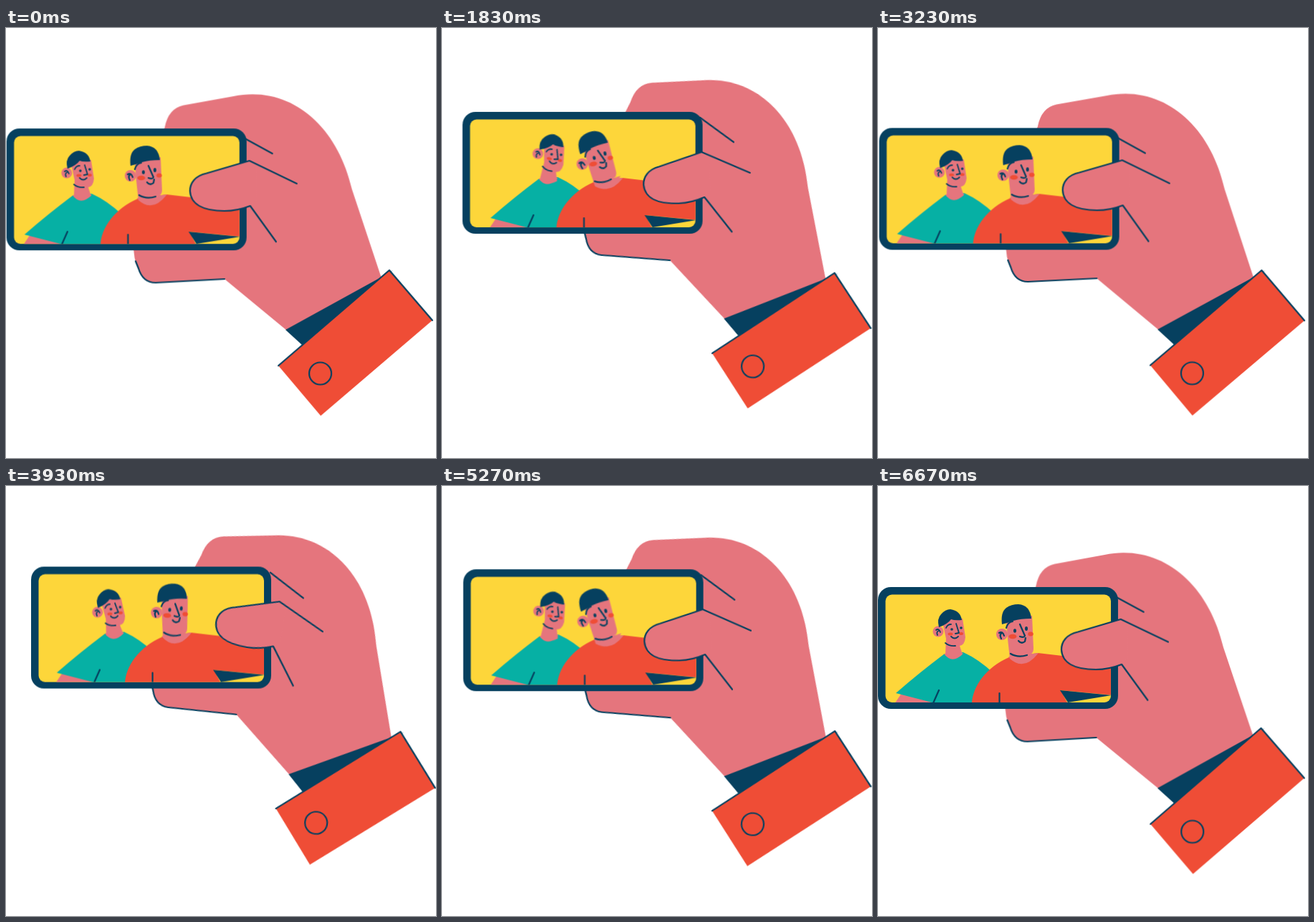
An HTML page without scripts for the animation above (6710 ms loop, 600 by 600 pixels).

```html
<!DOCTYPE html>
<html lang="en">
<head>
<meta charset="utf-8">
<title>Selfie</title>
<style>
  :root { --navy: #06405f; --skin: #e5757d; --red: #ef4d36; --teal: #06b0a4; --sun: #fdd63a; }
  html, body { margin: 0; width: 100%; height: 100%; overflow: hidden; background: #fff; }
  svg { display: block; width: 100%; height: 100%; }

  .navy { fill: var(--navy); }
  .skin { fill: var(--skin); }
  .red { fill: var(--red); }
  .teal { fill: var(--teal); }
  .sun { fill: var(--sun); }
  .line { fill: none; stroke: var(--navy); stroke-width: 2.2; stroke-linecap: round; stroke-linejoin: round; }
  .thin { stroke-width: 1.8; }

  .arm, .level, .head, .slide, .thumb {
    --s: 1;
    animation: 3355ms -40ms infinite cubic-bezier(.37, 0, .63, 1);
  }
  .arm, .level { animation-name: swing; }
  .arm { transform-origin: 512px 439px; }
  /* the phone stays level while the hand turns */
  .level { --s: -1; transform-origin: 320px 236px; }
  .head { animation-name: nod; }
  .big { transform-origin: 204px 238px; }
  .small { --s: -1; transform-origin: 107px 235px; }
  .slide { animation-name: slide; }
  .thumb { animation-name: tap; transform-origin: 389px 250px; }

  @keyframes swing {
    0% { transform: rotate(calc(var(--s) * -.3deg)); animation-timing-function: cubic-bezier(.33, .1, .66, .96); }
    27.72% { transform: rotate(calc(var(--s) * 12.15deg)); }
    49.78% { transform: rotate(calc(var(--s) * 7.05deg)); }
    67.66% { transform: rotate(calc(var(--s) * 8.3deg)); animation-timing-function: cubic-bezier(.36, .05, .72, .85); }
    100% { transform: rotate(calc(var(--s) * -.3deg)); }
  }
  @keyframes nod {
    0%, 7.2%, 96.6%, 100% { transform: rotate(0deg); }
    26.5% { transform: rotate(calc(var(--s) * 6deg)); }
    43.5%, 68.3% { transform: rotate(calc(var(--s) * -11.7deg)); }
  }
  @keyframes slide {
    0%, 4.2%, 93.6%, 100% { transform: translateX(0); }
    25%, 63.8% { transform: translateX(14px); }
  }
  @keyframes tap {
    0%, 45.3%, 67.7%, 100% { transform: rotate(0deg); }
    54.8%, 57.2% { transform: rotate(-10deg); }
  }
</style>
</head>
<body>
<svg viewBox="0 0 600 600">
  <defs>
    <clipPath id="screen"><rect x="11.5" y="150.5" width="314.5" height="150.5" rx="9"/></clipPath>
  </defs>

  <g class="arm">
    <!-- hand -->
    <path class="skin" d="M209 175L222 138Q227 112 248 107.500L318 95C397 79 463 136 483 225L525 352L413 440L392 422L305 350L209 355Q190 355 184 334Q178 322 178 300V200Z"/>
    <path class="line" d="M181 325L185 335Q191 355 209 355L305 350M321 147L372 175"/>

    <!-- sleeve -->
    <path class="navy" d="M390 421L523 348L540 338L413 442Z"/>
    <path class="red" d="M380 471L535 338L595 408L439 541Z"/>
    <path class="line" d="M380 471L535 338L595 408"/>
    <circle class="line" cx="438.5" cy="482" r="15.5"/>

    <g class="level">
      <rect class="navy" x="1" y="140" width="335" height="170" rx="18"/>
      <rect class="sun" x="11.5" y="150.5" width="314.5" height="150.5" rx="9"/>
      <g clip-path="url(#screen)">

        <!-- friend in teal -->
        <g class="slide">
          <path class="skin" d="M34 288L24 303H84V294Z"/>
          <path class="teal" d="M26 288Q58 260 94 233L120 231Q142 241 162 260V303H84Z"/>
          <path class="skin" d="M93 233Q105 249 120 232Z"/>
          <path class="line" d="M86 284L78 302"/>
          <g class="head small">
            <path class="skin" d="M90 184H119L123 210Q122 221 115 222L119 234Q106 245 95 235L96 212Z"/>
            <circle class="skin" cx="85" cy="202" r="7.5"/>
            <path class="navy" d="M86 196Q83 184 89 178Q95 171 102 171Q116 173 118 186Q108 187 103 185Q98 192 86 196Z"/>
            <ellipse class="red" cx="102" cy="205.5" rx="3.5" ry="2"/>
            <ellipse class="red" cx="117" cy="205" rx="3" ry="2"/>
            <circle class="navy" cx="104" cy="199" r="1.8"/>
            <circle class="navy" cx="117" cy="197" r="1.8"/>
            <path class="line thin" d="M82 200Q86 197 88 203M84 207Q82 202 86 201M96 197Q98 192 103 192M110 191L114 204L109 205M103 209Q108 214 113 209M95 218Q101 223 109 222"/>
          </g>
        </g>

        <!-- friend in red -->
        <path class="red" d="M132 303C133 278 152 252 184 238L224 232L267 237L330 247V291L256 284L266 303Z"/>
        <path class="navy" d="M255 284L327 291L266 301Z"/>
        <path class="skin" d="M183 237Q203 260 225 232Z"/>
        <path class="line" d="M170.5 288V302"/>
        <g class="head big">
          <path class="skin" d="M180 186L216 180L218 226Q218 233 212 234L223 233Q204 256 185 240L182 212Z"/>
          <circle class="skin" cx="174" cy="206" r="8"/>
          <path class="navy" d="M174 192Q172 175 180 169Q187 164 197 164Q213 165 215 184Q200 184 190 187Q182 190 174 192Z"/>
          <ellipse class="red" cx="189" cy="209" rx="5.5" ry="3.3"/>
          <ellipse class="red" cx="214" cy="205.5" rx="3.8" ry="3"/>
          <ellipse class="navy" cx="192" cy="201" rx="2" ry="2.8"/>
          <ellipse class="navy" cx="208" cy="198" rx="2" ry="3"/>
          <path class="line" d="M170 204Q175 201 177 208M173 212Q170 206 174 204M180 197Q182 189 189 188M199 192L206 208Q205 211 199 209M197 215Q201 220 206 216L207 211M186 233Q196 239 209 235"/>
        </g>
      </g>
    </g>

    <!-- thumb taps the shutter -->
    <g class="thumb">
      <path class="skin" d="M340 185L280 202.5C264 206 257 216 257 227C258 246 276 255 305 255Q323 255 341 248L350 240V190Z"/>
      <path class="line" d="M406 217L340 185L280 202.5C264 206 257 216 257 227C258 246 276 255 305 255Q323 255 341 248L377 298"/>
    </g>
  </g>
</svg>
</body>
</html>
```
